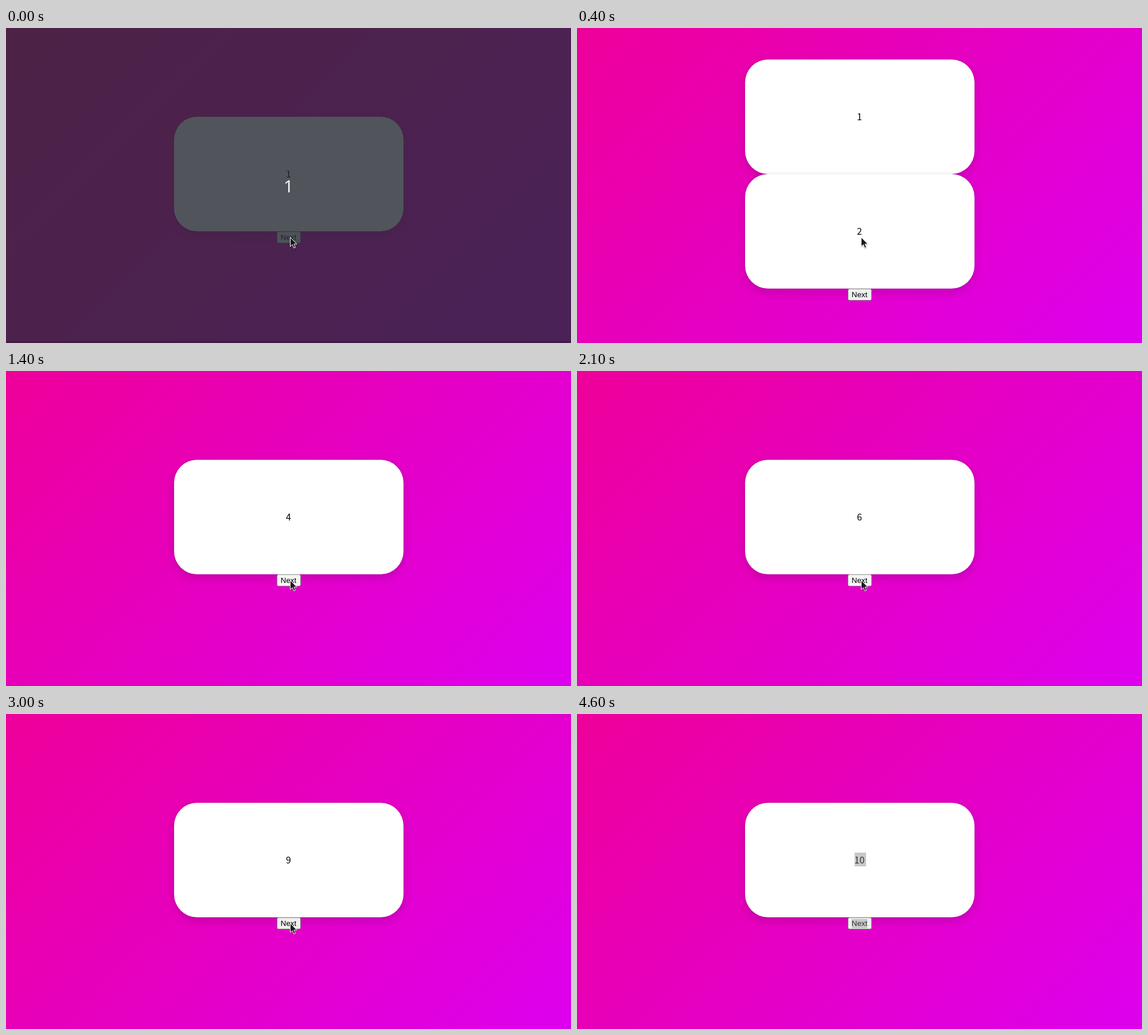
Write an HTML page that moves like this. It is 985 by 550 pixels and loops after 4.7 s.

```html
<!DOCTYPE html>
<html>
<head>
<meta charset="utf-8">
<style>
  html, body { margin: 0; width: 100%; height: 100%; overflow: hidden; }
  body { position: relative; background: linear-gradient(135deg, #e09, #d0e); }
  #stack, #next, #veil, #cursor { position: absolute; }
  #stack { left: 292.5px; }
  .card {
    box-sizing: border-box; width: 400px; height: 200px; padding-top: 87px;
    border-radius: 40px; background: #fff; text-align: center;
    font: 300 16px/24px "Noto Sans CJK JP", "Noto Sans CJK SC", "Noto Sans CJK", sans-serif;
    position: relative;
    box-shadow: 0 0 2px rgba(0,0,0,.22), 0 6px 16px rgba(0,0,0,.15);
  }
  .card span { display: inline-block; height: 24px; vertical-align: top; }
  .card .sel { padding-right: 3px; margin-right: -3px; }
  #next {
    box-sizing: border-box; left: 471.5px; width: 42px; height: 21px; padding-top: 2px;
    border: 1px solid #767676; border-radius: 3px; background: #efefef;
    text-align: center; white-space: nowrap;
    font: 13.333px/16px "Liberation Sans", Arial, sans-serif;
  }
  #next span { display: inline-block; height: 16px; vertical-align: top; }
  #next.down { background: #f5f5f5; border-color: #8d8d8d; }
  .sel { background: #9ac8ff; }
  .blur .sel { background: #c8c8c8; color: #323232; }
  #veil { inset: 0; background: rgba(38,43,50,.8); }
  #veil::after {
    content: ""; position: absolute; left: 0; right: 0; top: 546px; height: 4px;
    background: rgba(0,0,0,.15);
  }
  #veil div {
    position: absolute; top: 255px; width: 985px; text-align: center; color: #fff;
    font: 30px/41px "Open Sans", "Noto Sans", sans-serif;
  }
  #cursor { left: 0; top: 0; overflow: visible; filter: drop-shadow(0 1px 1px rgba(0,0,0,.3)); }
</style>
</head>
<body>
<div id="stack">
  <div class="card"><span></span></div>
  <div class="card"><span></span></div>
</div>
<div id="next"><span>Next</span></div>
<div id="veil"><div>1</div></div>
<svg id="cursor" width="14" height="21">
  <path d="M.5 .5V16.5L4.2 13.2L6.8 19.2L9.6 18L7 12.2H12Z" fill="#1a1a1a" stroke="#fff"/>
</svg>
<script>
const LOOP = 4700;
const $ = id => document.getElementById(id);
const cards = [...document.querySelectorAll('.card')];
const labels = cards.map(c => c.firstChild);
const nextLabel = $('next').firstChild;

// time, number shown, state of the click
const clicks = [
  [0, 1, ''], [300, 1, 'down'], [400, 1, 'both'],
  [500, 2, ''], [700, 2, 'down'], [800, 2, 'both'],
  [1000, 3, 'down'], [1100, 4, ''], [1400, 4, 'down'],
  [1500, 5, ''], [1700, 5, 'down'], [1800, 6, ''],
  [2100, 6, 'down'], [2200, 6, 'both'],
  [2400, 7, 'down'], [2700, 7, 'both'],
  [2800, 8, 'down'], [2900, 8, 'both'],
  [3000, 9, ''], [3200, 10, '']
];
// time, x, y of the pointer
const pointer = [
  [0, 495, 365], [3600, 520, 355], [3700, 582, 318], [3800, 634, 268],
  [3900, 606, 232], [4000, 572, 209], [4100, 564, 206], [4200, 220, 33]
];
const at = (steps, t) => steps.filter(s => s[0] <= t).pop();

function draw(t) {
  const [, n, state] = at(clicks, t);
  const [, x, y] = at(pointer, t);
  const both = state === 'both', selected = t >= 4000;
  const top = both ? 55 : 155;

  $('stack').style.top = top + 'px';
  $('next').style.top = top + (both ? 400 : 200) + 'px';
  $('next').className = state === 'down' ? 'down' : '';
  cards[1].style.display = both ? '' : 'none';
  labels.forEach((label, i) => label.textContent = n + i);

  labels[0].className = nextLabel.className = selected ? 'sel' : '';
  document.body.className = t >= 4600 ? 'blur' : '';
  $('veil').style.display = t < 100 ? '' : 'none';
  $('cursor').style.display = t < 4400 ? '' : 'none';
  $('cursor').style.transform = `translate(${x}px,${y}px)`;
}

const start = performance.now();
function tick() {
  draw((performance.now() - start) % LOOP);
  requestAnimationFrame(tick);
}
tick();
</script>
</body>
</html>
```
